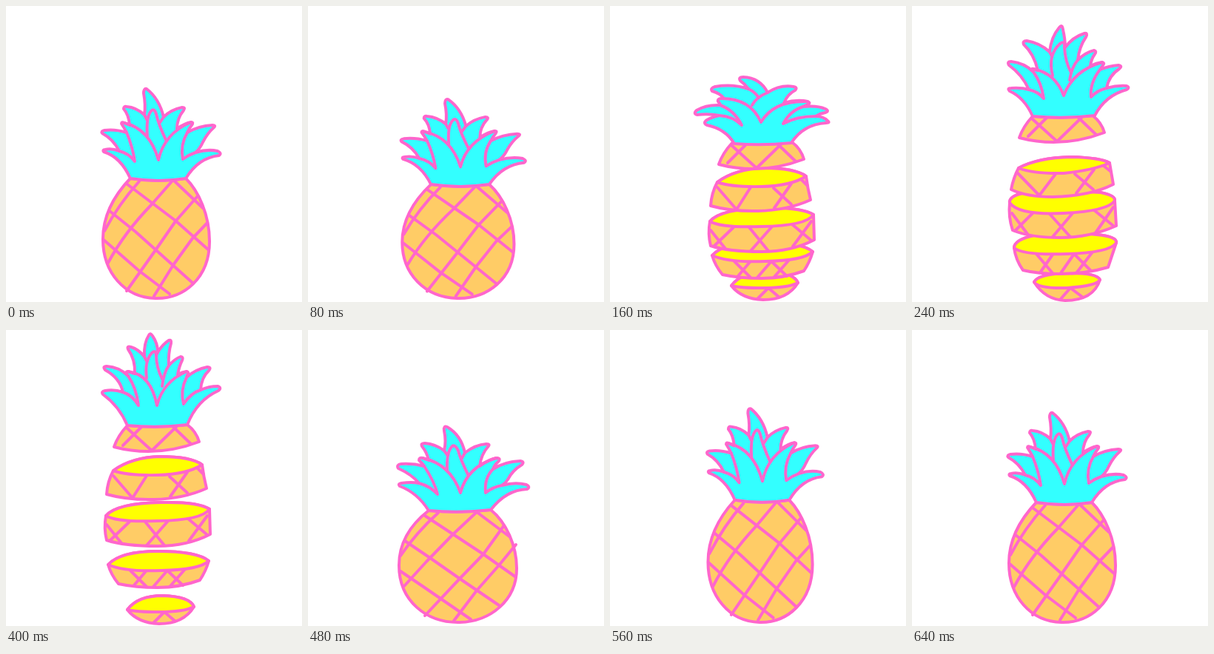
An HTML page for the animation above (0.88 s loop, 400 by 400 pixels).

```html
<!DOCTYPE html>
<html lang="en">
<head>
<meta charset="utf-8">
<title>Sliced pineapple</title>
<style>
html, body { margin: 0; width: 100%; height: 100%; overflow: hidden; background: #fff; }
svg { display: block; width: 100%; height: 100%; }
path { stroke: #f6c; stroke-width: 4; stroke-linejoin: round; stroke-linecap: round; vector-effect: non-scaling-stroke; }
.pose { visibility: hidden; }
</style>
</head>
<body>
<svg id="stage" viewBox="0 0 400 400"></svg>
<script>
const CYAN = '#3ff', ORANGE = '#fc6', YELLOW = '#ff0';
const LOOP = 880;

// Leaf crowns: silhouette and inner lines
const crowns = {
  rest: [
    'M168 233Q155 204 132 197Q130 194 134 194Q143 192 153 196Q145 180 130 172Q128 169 133 168Q147 166 163 171Q160 165 156 159Q156 156 160 158L167 161Q166 147 159 139Q159 135 163 136Q176 137 187 147Q189 134 186 118Q186 111 190 112Q207 125 213 150Q223 140 238 137Q243 137 240 141Q231 152 231 166Q242 158 250 157Q254 157 251 161Q247 166 245 171Q260 162 279 161Q284 161 281 164Q272 172 266 184Q262 193 256 198Q272 193 286 196Q292 199 288 202Q260 205 243 233Q206 239 168 233Z',
    'M153 196Q166 199 174 210Q171 190 163 171M160 158Q194 166 206 208Q214 172 250 157M245 171Q235 188 239 207Q247 201 256 198M191 177Q189 150 196 142Q200 137 203 146Q206 160 217 183M187 147L190 153M213 150L207 159'
  ],
  squash: [
    'M163 244Q148 220 124 211Q121 208 126 207Q140 205 150 207Q140 195 122 187Q119 182 126 181Q142 180 157 184Q155 181 150 176Q150 172 155 173L163 176Q161 166 154 157Q152 153 158 153Q172 154 184 163Q187 150 184 136Q183 129 188 131Q207 142 212 166Q226 155 241 154Q247 154 243 158Q234 168 232 184Q245 174 256 173Q261 174 257 178Q252 182 250 188Q265 178 287 177Q293 178 289 182Q276 190 270 202Q267 207 262 210Q280 205 295 209Q301 212 296 215Q268 216 247 243Q205 248 163 244Z',
    'M150 207Q165 211 175 222Q171 205 157 184M155 173Q192 181 206 220Q215 185 254 173M250 188Q238 200 240 220Q250 212 262 210M188 190Q187 166 194 158Q198 153 203 163Q206 175 217 197M184 163L189 170M212 166L207 175'
  ],
  droop: [
    'M168 186Q156 166 131 161Q125 158 131 154Q138 150 148 148Q133 145 118 147Q112 146 117 141Q130 133 149 134Q149 132 146 129Q145 125 151 125L154 125Q149 118 138 115Q135 111 142 109Q166 105 187 112Q182 105 176 101Q173 96 180 96Q203 97 213 117Q230 106 248 109Q254 110 250 114Q240 119 235 131Q252 126 267 129Q272 131 267 133L261 136Q280 134 291 139Q297 142 291 144Q284 145 278 149Q288 149 294 155Q298 158 292 158Q261 160 245 185Q206 189 168 186Z',
    'M148 148Q166 149 178 161Q168 141 149 134M151 125Q190 125 204 157Q222 127 267 129M261 136Q244 141 234 159Q252 149 278 149M192 134Q198 123 213 117M187 112Q196 116 201 124'
  ],
  rise: [
    'M163 149Q152 124 132 115Q128 111 134 111Q148 110 158 113Q149 93 131 80Q128 75 134 75Q152 77 164 89Q159 84 164 85L170 87Q165 65 151 52Q149 47 155 47Q173 50 186 62Q188 42 199 29Q203 24 204 32Q207 45 207 56Q217 42 233 37Q238 36 235 42Q226 55 224 73Q234 63 246 60Q250 61 247 65Q242 72 241 81Q249 77 257 76Q261 77 258 80L254 86Q266 81 279 80Q285 81 280 85Q266 94 263 111Q277 107 290 108Q295 110 290 113Q261 121 247 148Q205 153 163 149Z',
    'M158 113Q171 116 178 125Q175 104 164 89M164 85Q194 91 205 121Q218 87 257 76M224 73Q216 82 213 100M254 86Q240 104 242 123Q250 114 263 111M190 94Q183 66 200 51Q207 46 206 56Q207 75 215 90M186 62L188 66'
  ],
  high: [
    'M164 129Q153 103 131 87Q128 83 134 82Q147 80 158 84Q154 65 134 54Q130 49 136 49Q153 50 165 62Q160 56 165 56L174 59Q175 40 165 26Q163 21 169 23Q179 26 187 36Q186 18 193 7Q195 3 198 8Q205 18 205 30Q212 19 220 14Q224 13 223 18Q219 32 220 48Q228 39 236 36Q240 36 238 41Q234 49 232 60Q238 57 244 56Q248 57 245 61L244 64Q256 53 272 50Q278 50 274 55Q264 64 263 81Q274 76 286 76Q292 78 287 82Q258 95 245 128Q205 133 164 129Z',
    'M158 84Q171 88 179 102Q176 78 165 62M165 56Q196 60 204 102Q212 70 244 56M220 48Q213 58 211 76M244 64Q235 82 240 100Q250 85 263 81M190 65Q187 42 197 31Q202 26 203 34Q203 50 211 66M187 36L190 42M205 30L203 34'
  ]
};

const bodies = {
  rest: [
    'M168 233Q206 239 243 233C260 250 275 282 275 318C275 368 240 396 202 395C160 394 131 360 131 315C131 282 146 256 168 233Z',
    'M180 237Q152 268 133 304M225 236L197 268Q160 306 138 347M258 258L229 291L202 330L163 385M272 293L252 314L226 350L200 392M227 236L266 273M164 241L229 290L273 329M140 277L175 305L252 374M132 316L148 330L180 358L221 389'
  ],
  squash: [
    'M163 244Q205 248 247 243C268 260 282 292 282 322C282 366 246 394 205 395C160 396 123 366 123 318C123 286 140 262 163 244Z',
    'M176 247Q147 273 125 305M228 246L196 276L160 313L130 346M265 264L237 303L205 336L158 386M281 290L258 318L228 352L197 393M228 246L272 279M158 251L196 276L237 303L281 334M131 285L165 308L205 336L258 372M125 326L156 347L220 391'
  ]
};

// Slices from top to bottom: side, cut face, rind lines
const cap = ['M164 129Q205 133 245 128Q257 137 261 151Q203 173 146 158Q151 143 164 129Z', '',
  'M164 133L197 163L230 131M183 131L158 156M226 131L250 154'];

const settled = [
  cap,
  ['M145 190Q170 172 208 171Q250 171 265 182Q267 198 271 214Q240 228 200 229Q165 230 136 222Q137 205 145 190Z',
   'M145 190Q170 172 208 171Q250 171 265 182Q245 195 205 196Q165 197 145 190Z',
   'M145 197L171 227L190 197M221 198L245 220M245 192L222 225M259 187L267 195'],
  ['M135 251Q150 234 210 233Q260 232 275 242L276 276Q245 292 205 292Q160 292 136 284Q132 268 135 251Z',
   'M135 251Q150 234 210 233Q260 232 275 242Q265 257 205 258Q150 260 135 251Z',
   'M136 263L156 288M167 259L140 285M188 259L214 291M219 258L190 291M246 255L271 276M272 251L247 285'],
  ['M138 317Q155 299 205 299Q258 299 274 312Q270 326 262 338Q235 348 205 348Q175 348 152 343Q142 331 138 317Z',
   'M138 317Q155 299 205 299Q258 299 274 312Q262 324 210 325Q160 327 138 317Z',
   'M168 325L190 347M189 326L173 345M199 347L218 325L239 345M243 322L222 346'],
  ['M164 378Q178 359 212 359Q248 360 254 374Q240 397 207 397Q178 396 164 378Z',
   'M164 378Q178 359 212 359Q248 360 254 374Q240 381 207 381Q175 381 164 378Z',
   'M199 396L214 381L228 393']
];

const rising = [
  cap,
  ['M144 219Q170 205 215 204Q255 205 267 212L272 241Q240 257 190 258Q155 258 134 248Q137 232 144 219Z',
   'M144 219Q170 205 215 204Q255 205 267 212Q245 222 205 226Q165 227 144 219Z',
   'M142 225L172 256L194 227M220 227L245 248M246 221L222 253M259 216L269 224'],
  ['M132 266Q131 257 150 253Q200 248 255 252Q275 256 274 263L276 297Q240 313 200 313Q160 313 136 303Q130 285 132 266Z',
   'M132 266Q131 257 150 253Q200 248 255 252Q275 256 274 263Q265 277 205 280Q145 283 132 266Z',
   'M135 280L156 308M164 279L139 304M186 281L214 312M217 280L190 312M245 275L272 297M272 272L247 308'],
  ['M138 327Q138 316 165 310Q210 304 250 309Q278 312 276 320Q270 338 265 353Q235 362 200 362Q170 362 150 357Q140 343 138 327Z',
   'M138 327Q138 316 165 310Q210 304 250 309Q278 312 276 320Q268 333 210 335Q150 337 138 327Z',
   'M168 335L190 361M190 336L174 359M201 361L219 335L241 357M245 331L222 361'],
  ['M165 373Q170 363 205 361Q250 360 254 370Q245 398 207 398Q180 397 165 373Z',
   'M165 373Q170 363 205 361Q250 360 254 370Q250 378 210 381Q170 382 165 373Z',
   'M200 397L214 381L230 393']
];

const path = (d, fill) => d ? `<path d="${d}" fill="${fill}"/>` : '';
const group = (inner, move) => `<g transform="${move}">${inner}</g>`;
const shape = ([area, lines], fill) => path(area, fill) + path(lines, 'none');
const shift = (x, y) => `translate(${x} ${y})`;

function whole(name, sx = 1, sy = 1) {
  const art = shape(bodies[name], ORANGE) + shape(crowns[name], CYAN);
  return group(art, `translate(205 395) scale(${sx} ${sy}) translate(-205 -395)`);
}

// Lower slices are painted first
function cut(name, slices, moves, lift = 0) {
  const parts = slices.map(([side, face, lines], i) =>
    group(path(side, ORANGE) + path(lines, 'none') + path(face, YELLOW), shift(...moves[i])));
  return parts.reverse().join('') + group(shape(crowns[name], CYAN), shift(0, lift));
}

// Start time of each pose and its drawing
const poses = [
  [0, whole('rest')],
  [80, whole('rest', 1.05, .95)],
  [160, cut('droop', settled, [[1, 56], [0, 48], [0, 40], [0, 20], [0, 0]])],
  [240, cut('rise', rising, [[-1, 20], [0, 0], [0, 0], [0, 0], [0, 0]])],
  [320, cut('high', settled, [[0, 5], [0, 8], [0, 6], [0, 3], [0, 0]], 5)],
  [400, cut('high', settled, [[0, 0], [0, 0], [0, 0], [0, 0], [0, 0]])],
  [480, whole('squash')],
  [560, whole('rest', .98, 1.02)],
  [640, whole('rest')]
];

const stage = document.getElementById('stage');
stage.innerHTML = poses.map(([, art]) => `<g class="pose">${art}</g>`).join('');
const layers = [...stage.children];

function draw() {
  const t = performance.now() % LOOP;
  const now = poses.findLastIndex(([start]) => start <= t);
  layers.forEach((layer, i) => { layer.style.visibility = i === now ? 'visible' : 'hidden'; });
  requestAnimationFrame(draw);
}
draw();
</script>
</body>
</html>
```
